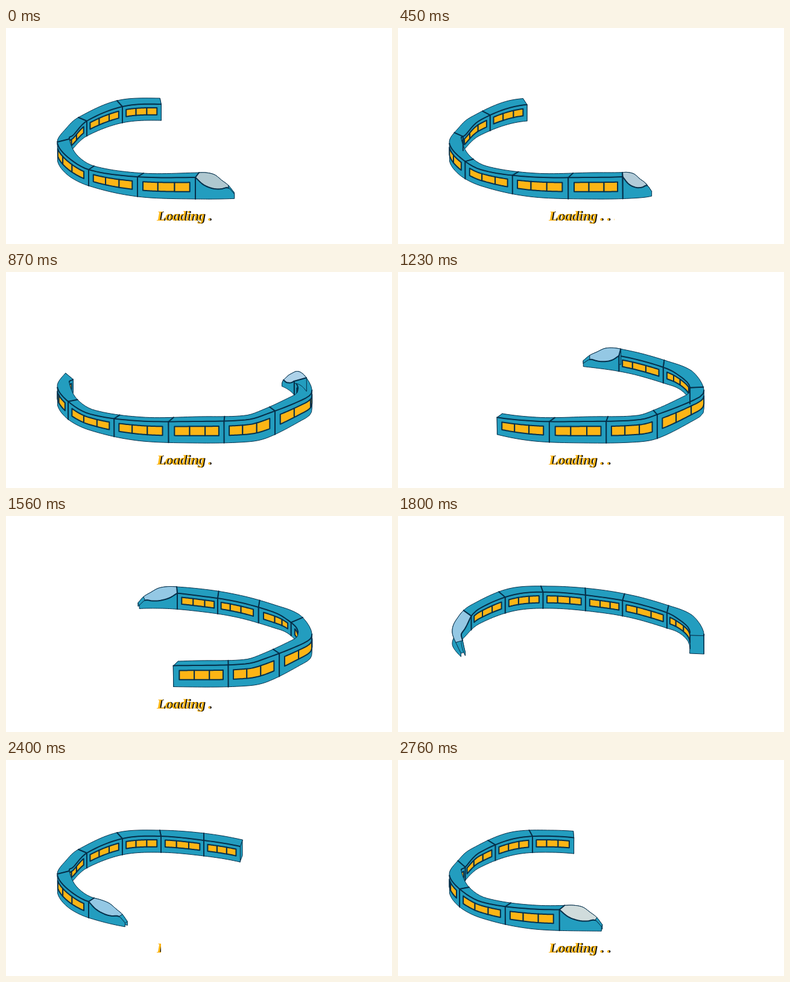
Write an HTML page with a canvas that moves like this. It is 640x360 px and loops after 2.79 s.

```html
<!DOCTYPE html>
<html lang="en">
<head>
<meta charset="utf-8">
<title>Loading</title>
<style>
  html, body { margin: 0; width: 100%; height: 100%; overflow: hidden; background: #fff; }
  canvas { position: absolute; left: 0; top: 0; }
  #label {
    position: absolute; left: 250px; top: 300px;
    height: 28px; line-height: 28px; white-space: pre;
    font: italic bold 23px/28px "Liberation Serif", "Noto Serif", serif;
    color: #fdb515; text-shadow: 1px 0 #111, 2px 0 #111;
  }
</style>
</head>
<body>
<canvas id="stage" width="640" height="360"></canvas>
<div id="label">Loading . . .</div>
<script>
const LOOP = 2790, STEP = 30, LAP = 12, CARS = 6;
const BODY = '#239dbf', INK = '#06304b', PANE = '#fdb515';
const ctx = document.getElementById('stage').getContext('2d');
const label = document.getElementById('label');

// Track, in car lengths: u, outer roof x y, inner roof x y, wall height
const TRACK = [
  [0, 314, 249, 320, 241, 36],
  [1, 401, 246, 397, 239, 37],
  [1.4, 434, 236, 427, 229, 40],
  [2, 487, 215, 470, 209, 34],
  [2.2, 506, 203, 483, 201, 32],
  [2.45, 503, 184, 482, 187, 24],
  [2.7, 486, 164, 468, 174, 22],
  [3.3, 445, 148, 443, 160, 26],
  [4, 392, 133, 388, 144, 26],
  [5, 328, 122, 328, 134, 26],
  [6, 255, 117, 257, 127, 27],
  [7, 184, 121, 193, 131, 27],
  [8, 120, 149, 134, 155, 25],
  [8.5, 100, 167, 112, 178, 22],
  [9, 85, 190, 105, 185, 28],
  [9.5, 101, 214, 117, 211, 30],
  [10, 137, 236, 146, 230, 27],
  [11, 218, 248, 228, 242, 33]
];
// Nose length and windscreen colour along the track
const NOSE = [
  [0, .74, 176, 200, 208], [1.9, .3, 188, 215, 235], [3, .6, 160, 205, 230],
  [4.35, .95, 148, 200, 228], [5.62, .93, 148, 200, 228], [8.25, 1.1, 148, 200, 228],
  [10, .76, 148, 200, 228], [11.5, .74, 208, 220, 220]
];
// Nose height: near edge, far edge
const TAPER = [[0, 1, 1], [.2, .66, 1], [.45, .48, .92], [.65, .46, .7], [.84, .5, .5], [1, .2, .2]];
// Track ranges where the inner and outer walls face the viewer
const FACING = [[2.33, 8.93], [-2.95, 2.28]];
// Visible width of the label over time
const REVEAL = [
  [0, 91], [330, 91], [500, 116], [690, 91], [870, 91], [900, 104], [1230, 104],
  [1380, 116], [1560, 91], [1740, 0], [2370, 0], [2400, 7], [2760, 104], [2790, 104]
];

const mod = (x, m) => ((x % m) + m) % m;

function spline(table, x, lap) {
  const n = table.length;
  if (lap) x = mod(x, lap);
  const at = i => {
    if (!lap) return table[Math.max(0, Math.min(n - 1, i))];
    const [k, ...v] = table[mod(i, n)];
    return [k + lap * Math.floor(i / n), ...v];
  };
  let i = 0;
  while (i < n - (lap ? 1 : 2) && table[i + 1][0] <= x) i++;
  const [p, a, b, q] = [at(i - 1), at(i), at(i + 1), at(i + 2)];
  const d = b[0] - a[0], s = (x - a[0]) / d, s2 = s * s, s3 = s2 * s;
  return a.slice(1).map((v, j) => {
    const k = j + 1;
    const m = (b[k] - p[k]) / (b[0] - p[0]) * d;
    const w = (q[k] - a[k]) / (q[0] - a[0]) * d;
    return (2 * s3 - 3 * s2 + 1) * v + (s3 - 2 * s2 + s) * m
      + (3 * s2 - 2 * s3) * b[k] + (s3 - s2) * w;
  });
}

function linear(table, x) {
  let i = 0;
  while (i < table.length - 2 && table[i + 1][0] <= x) i++;
  const [a, b] = [table[i], table[i + 1]];
  return a[1] + (b[1] - a[1]) * (x - a[0]) / (b[0] - a[0]);
}

// side: 0 inner, 1 outer; z: 0 floor, 1 roof
function pos(u, side, z) {
  const [ox, oy, ix, iy, h] = spline(TRACK, u, LAP);
  return [ix + (ox - ix) * side, iy + (oy - iy) * side + (1 - z) * h];
}

function edge(a, b, side, z, n = 12) {
  return Array.from({ length: n + 1 }, (_, i) => pos(a + (b - a) * i / n, side, z));
}

function draw(points, fill, width) {
  ctx.beginPath();
  points.forEach(([x, y]) => ctx.lineTo(x, y));
  if (fill) {
    ctx.closePath();
    ctx.fillStyle = fill;
    ctx.fill();
  }
  ctx.lineWidth = width;
  ctx.strokeStyle = INK;
  ctx.stroke();
}

function strip(a, b, side, low, high, fill, width) {
  draw([...edge(a, b, side, low), ...edge(b, a, side, high)], fill, width);
}

// Calls fn for the parts of a..b whose wall can be seen
function seen(a, b, side, fn) {
  for (const lap of [-LAP, 0, LAP]) {
    const lo = Math.max(a, FACING[side][0] + lap);
    const hi = Math.min(b, FACING[side][1] + lap);
    if (hi - lo > .02) fn(lo, hi);
  }
}

function wall(u, side) {
  seen(u, u + 1, side, (a, b) => strip(a, b, side, 0, 1, BODY, 1));
  for (const [from, to] of [[.1, .36], [.36, .64], [.64, .9]]) {
    seen(u + from, u + to, side, (a, b) => strip(a, b, side, .34, .77, PANE, 2));
  }
}

function roof(u) {
  draw([...edge(u, u + 1, 1, 1), ...edge(u + 1, u, 0, 1)], BODY, 1);
  for (const side of [0, 1]) {
    seen(u, u + 1, side, (a, b) => draw(edge(a, b, side, 1), null, 2));
  }
}

function joint(u) {
  draw([pos(u, 0, 1), pos(u, 1, 1)], null, 2);
  for (const side of [0, 1]) {
    seen(u - .03, u + .03, side, () => draw([pos(u, side, 1), pos(u, side, 0)], null, 2));
  }
}

function nose(u) {
  const [len, ...rgb] = spline(NOSE, u, LAP);
  const pu = mod(u, LAP);
  const near = pu < 2.3 || pu > 9 ? 1 : 0;
  const line = (a, b, far, floor) => Array.from({ length: 17 }, (_, i) => {
    const w = a + (b - a) * i / 16;
    const side = far ? 1 - near + (2 * near - 1) * .6 * w * w : near;
    return pos(u + w * len, side, floor ? 0 : spline(TAPER, w)[far]);
  });
  draw([...line(0, 1, 1, true), ...line(1, 0, 1)], BODY, 1);
  draw([...line(.84, 1, 1), ...line(1, .84, 0)], BODY, 1);
  draw([...line(0, 1, 0, true), ...line(1, 0, 0)], BODY, 1);
  draw([...line(0, .84, 1), ...line(.84, 0, 0)], `rgb(${rgb.map(Math.round)})`, 1);
  draw(line(0, .84, 0), null, 2);
}

// Position of the front joint: three runs, each after a pause
function travel(t) {
  const start = t < 900 ? 0 : t < 1800 ? 900 : 1800;
  const k = Math.max(0, (t - start - 300) / STEP);
  if (start === 0) return .1336 * k;
  if (start === 900) return 4.235 + .1154 * k;
  return k < 10 ? 8.25 + .175 * k : 10 + .1267 * (k - 10);
}

function frame(now) {
  const t = Math.floor((now % LOOP) / STEP) * STEP;
  const front = travel(t), tail = front - CARS;
  const cars = Array.from({ length: CARS }, (_, i) => tail + i);

  ctx.clearRect(0, 0, 640, 360);
  ctx.lineJoin = ctx.lineCap = 'round';
  draw([pos(tail, 0, 1), pos(tail, 1, 1), pos(tail, 1, 0), pos(tail, 0, 0)], BODY, 1);
  cars.forEach(u => wall(u, 0));
  cars.forEach(u => wall(u, 1));
  cars.forEach(roof);
  cars.slice(1).forEach(joint);
  nose(front);
  joint(front);

  const width = linear(REVEAL, t);
  label.style.visibility = width > 0 ? 'visible' : 'hidden';
  label.style.clipPath = `inset(0 calc(100% - ${width}px) 0 -2px)`;
  requestAnimationFrame(frame);
}
frame(0);
</script>
</body>
</html>
```
